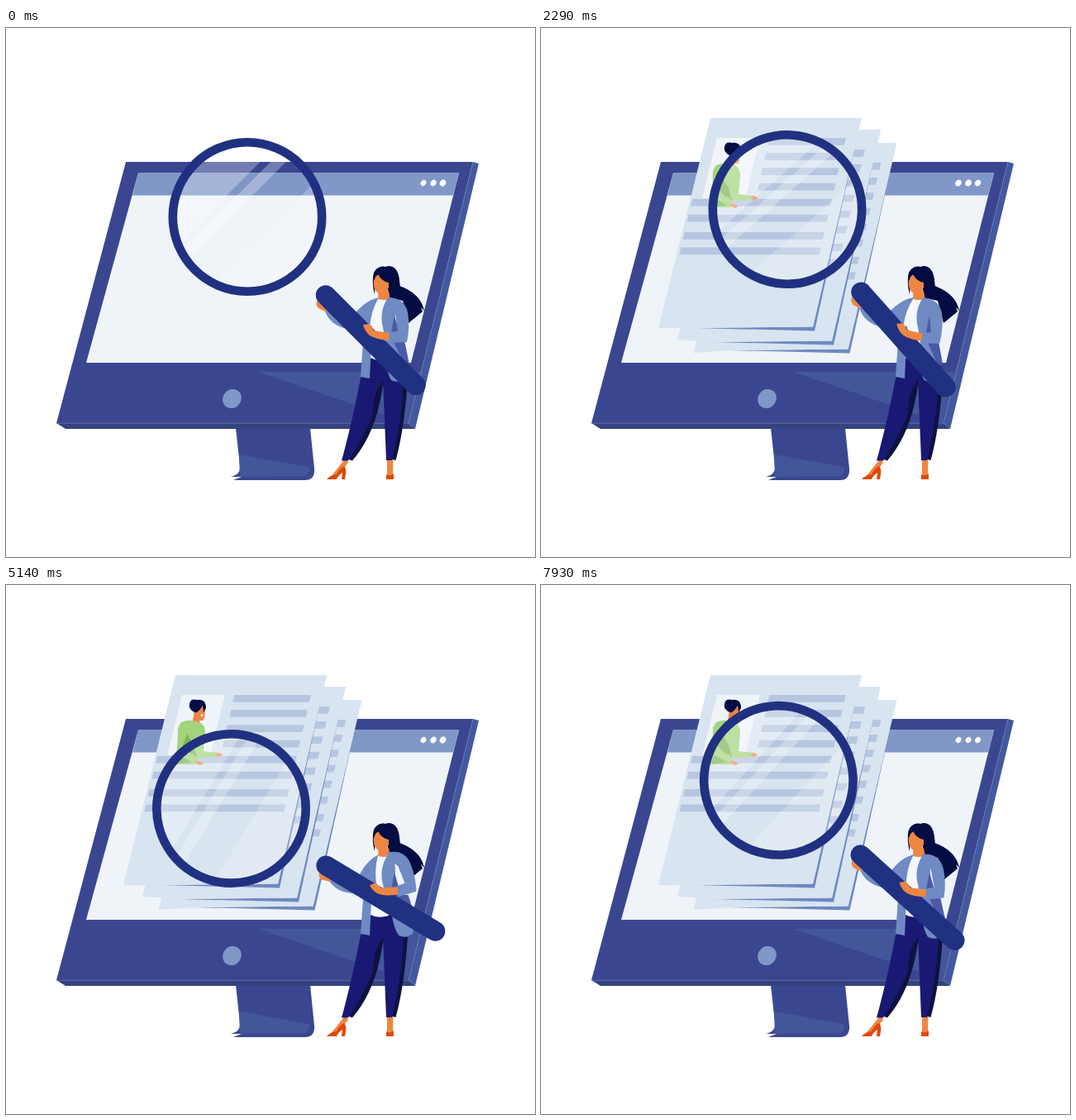
An HTML page for the animation above (8 s loop, 640x640 px).

```html
<!DOCTYPE html>
<html lang="en">
<head>
<meta charset="utf-8">
<title>Document search</title>
<style>
  html, body { margin: 0; width: 100%; height: 100%; overflow: hidden; background: #fff; }
  svg { display: block; width: 100%; height: 100%; }
</style>
</head>
<body>
<svg viewBox="0 0 640 640">
  <defs>
    <clipPath id="glass"><circle r="86"/></clipPath>
    <g id="content">
      <path fill="#eff4f9" d="M213 133H265L247 206H195Z"/>
      <g id="bars" fill="#b7c6e0"></g>
      <path fill="#ed8643" d="M228 148L240 147Q242 160 238 164L234 164L235 169L225 168L227 158Z"/>
      <path fill="#040c42" d="M222 144Q223 137 231 139Q242 137 242 149L239 154L238 146Q235 151 231 154Q227 155 224 151Q221 148 222 144Z"/>
      <path fill="#fff" d="M235 157L239 156L237 160Z"/>
      <path fill="#a4d37d" d="M211 167Q217 163 226 164L236 167Q241 170 241 179L239 201L256 203L256 208L236 209L229 208L234 214L228 217L205 217Q208 190 208 173Z"/>
      <path fill="#7db358" d="M219 180L227 194L231 209L224 202L228 214L205 217L209 207Z"/>
      <path fill="#a4d37d" d="M210 190L218 199L234 214L229 217L210 206Z"/>
      <path fill="#f08a4d" d="M254 204Q259 201 262 206L256 208ZM228 214Q235 212 239 216L234 218Z"/>
    </g>
  </defs>

  <!-- monitor -->
  <path fill="#3a4790" d="M278 484H368L373 533Q374 547 362 547H275L285 543H271Q284 541 283 530Z"/>
  <path fill="#44569a" d="M282 516L366 531Q369 535 363 542L283 543Z"/>
  <path fill="#34437e" d="M61 478H487L495 485H72Z"/>
  <path fill="#44589e" d="M565 162L572 164L495 485L487 478Z"/>
  <path fill="#3a4790" d="M145 162H565L487 478H61Z"/>
  <path fill="#44569a" d="M305 416H502L487 478Z"/>
  <path fill="none" stroke="#7284bb" stroke-width=".6" d="M61 478.300H487L565 162"/>
  <path fill="#eff4f9" d="M160 175.500H548L490 405H97Z"/>
  <path fill="#8097c8" d="M160 175.500H548L541 202.500H153Z"/>
  <ellipse fill="#8197c8" cx="273.500" cy="448.500" rx="10.800" ry="12" transform="rotate(38 273.500 448.500)"/>
  <g id="dots" fill="#fff"></g>

  <g id="sheets"></g>

  <!-- woman -->
  <path fill="#040c42" d="M444 301C445 290 454 287 459 289C470 285 477 295 476 312C490 317 503 326 506 342L502 338L504 343L487 357L480 330L462 326V306L447 302L446 322Q443 312 444 301Z"/>
  <path fill="#ed8643" d="M411 520L414 526L402 541L392 544L408 524ZM461 521H468.500L468 542H461ZM451 318H463L465 331H450Z"/>
  <path fill="#e2480a" d="M388 546Q392 541 400 540Q403 533 409 530Q413 533 410 546H406L407 538Q402 541 400 546ZM460 546V540Q465 543 469 539V546Z"/>
  <path fill="#0e1240" d="M454 420L486 426Q482 485 471.500 523L461 520L462 440L456 432Q448 490 419 523.500L410 520Z"/>
  <path fill="#191974" d="M440 398H476L481 430Q478 480 467 523L460 523L456 425Q449 437 446 446L443 470Q430 500 414 523.500H406Q418 480 429 424Z"/>
  <path fill="#f4f8fb" d="M449 328H464L463 400Q450 404 441 399L441 345Z"/>
  <path fill="#ed8643" d="M450 319H463L464 328Q456 330 451 328ZM445 304Q448 296 458 299L464 309Q463 321 453 322Q443 318 445 304Z"/>
  <path fill="#040c42" d="M445 306C443 291 453 288 459 289C469 286 476 295 477 314L463 320V308Q453 306 450 297Q447 300 445 306Z"/>
  <path fill="#708ac3" d="M433 365L443 360L440 424L429 422Z"/>
  <g id="tail">
    <path fill="#4a5aa7" d="M466 376L482 378L488 407L470 404Z"/>
    <path fill="#708ac3" d="M460 372L468 378L483 409L484 424Q476 431 466 426Q461 418 460 402Z"/>
  </g>
  <path fill="#708ac3" d="M462 326L470 330L471 347L466 380H459L456 362Q451 344 462 326Z"/>
  <path fill="#4a5aa7" d="M470 348L475 365L473 378H464Z"/>
  <g class="arm">
    <path fill="#ed8643" d="M376 330L386 338L390 345L378 339Q374 335 376 330Z"/>
    <path fill="#708ac3" d="M451 326C437 329 428 338 419 349L392 340L386 343C391 355 400 361 412 364L440 364Q441 343 451 326Z"/>
  </g>
  <g class="arm">
    <g transform="translate(292 228.500) rotate(45)">
      <g clip-path="url(#glass)" fill="#fff" opacity=".29">
        <rect x="-86" y="-86" width="50" height="172"/>
        <rect x="-27" y="-86" width="13" height="172"/>
        <rect x="28" y="-86" width="58" height="172" opacity=".8"/>
      </g>
      <g fill="none" stroke="#213181">
        <circle r="90.200" stroke-width="10.600"/>
        <path d="M134 0H288" stroke-width="24" stroke-linecap="round"/>
      </g>
    </g>
    <path fill="#708ac3" d="M462 326Q482 326 486 344Q489 362 485 380L462 381L463 368L474 367L471 345L463 334Z"/>
    <path fill="#ed8643" d="M432 359L440 358L445 366L464 369L463 378Q448 377 440 372Q434 367 432 359Z"/>
  </g>
</svg>
<script>
const LOOP = 8000;
const $ = s => document.querySelector(s);
const clamp = v => Math.min(1, Math.max(0, v));
const mix = (a, b, u) => a + (b - a) * u;

// Cubic easing with control points (x1, 0) and (x2, 1)
function ease(u, x1, x2) {
  let lo = 0, hi = 1;
  for (let i = 0; i < 24; i++) {
    const s = (lo + hi) / 2, r = 1 - s;
    if (3 * r * r * s * x1 + 3 * r * s * s * x2 + s ** 3 < u) lo = s; else hi = s;
  }
  return lo * lo * (3 - 2 * lo);
}
const span = (t, from, to, x1 = .33, x2 = .67) => ease(clamp((t - from) / (to - from)), x1, x2);

function add(parent, tag, attrs) {
  const el = document.createElementNS('http://www.w3.org/2000/svg', tag);
  for (const k in attrs) el.setAttribute(k, attrs[k]);
  return parent.appendChild(el);
}

[133, 151, 169.3, 187.7, 206.7, 225.7, 247, 265.5].forEach((y, i) => {
  const right = 369 - (y - 133) * .23, left = right - (i < 4 ? 92.5 : 169);
  add($('#bars'), 'path', { d: `M${left} ${y}H${right}l-2.200 8.800H${left - 2.2}Z` });
});

// drop: how far the lower right corner hangs below that of the front sheet
function sheet(x, y, drop, order) {
  const el = add($('#sheets'), 'g', {});
  const left = 188 - Math.abs(drop) * .7, low = 361.5 + drop;
  add(el, 'path', { fill: '#7089c2', d: `M${left} ${363 + drop}L329 ${low}L382 134L331 ${366.5 + drop}Z` });
  add(el, 'path', { fill: '#d8e4f0', d: `M205 109H388L329 ${low}L${left} ${363 + drop}L142 363Z` });
  add(el, 'use', { href: '#content' });
  return { x, y, order, el };
}
const sheets = [sheet(42.5, 30, -3, 2), sheet(23, 14, 3, 1), sheet(0, 0, 0, 0)];
const dots = [505, 517, 528.5].map(x => ({ x, el: add($('#dots'), 'ellipse', { rx: 3.1, ry: 3.8 }) }));
const arms = document.querySelectorAll('.arm');

function swing(t) {
  if (t < 2330) return mix(0, 3.3, span(t, 1640, 2330));
  if (t < 6600) return mix(3.3, -14, span(t, 2330, 3860, .36, .44));
  return mix(-14, 3.3, span(t, 6600, 9030, .85, .2));
}

function draw(t) {
  const a = swing(t);
  const turn = k => `rotate(${a * k} 453 329)`;
  arms.forEach(el => el.setAttribute('transform', turn(1)));
  $('#tail').setAttribute('transform', turn(.4));

  for (const { x, y, order, el } of sheets) {
    const start = 80 + order * 110;
    const s = mix(.8, 1, span(t, start, start + 920));
    el.setAttribute('transform', `translate(${x + 365} ${y + 311}) scale(${s}) translate(-365 -311)`);
    el.setAttribute('opacity', t < 140 ? 0 : clamp((t - 80 - order * 40) / 970));
  }

  dots.forEach(({ x, el }, i) => {
    const pulse = Math.max(0, Math.sin((t - 560 - i * 170) / 1286 * 2 * Math.PI));
    el.setAttribute('transform', `translate(${x} 187.500) rotate(38) scale(${1 + .12 * pulse})`);
  });
}

function tick() {
  draw(performance.now() % LOOP);
  requestAnimationFrame(tick);
}
tick();
</script>
</body>
</html>
```
